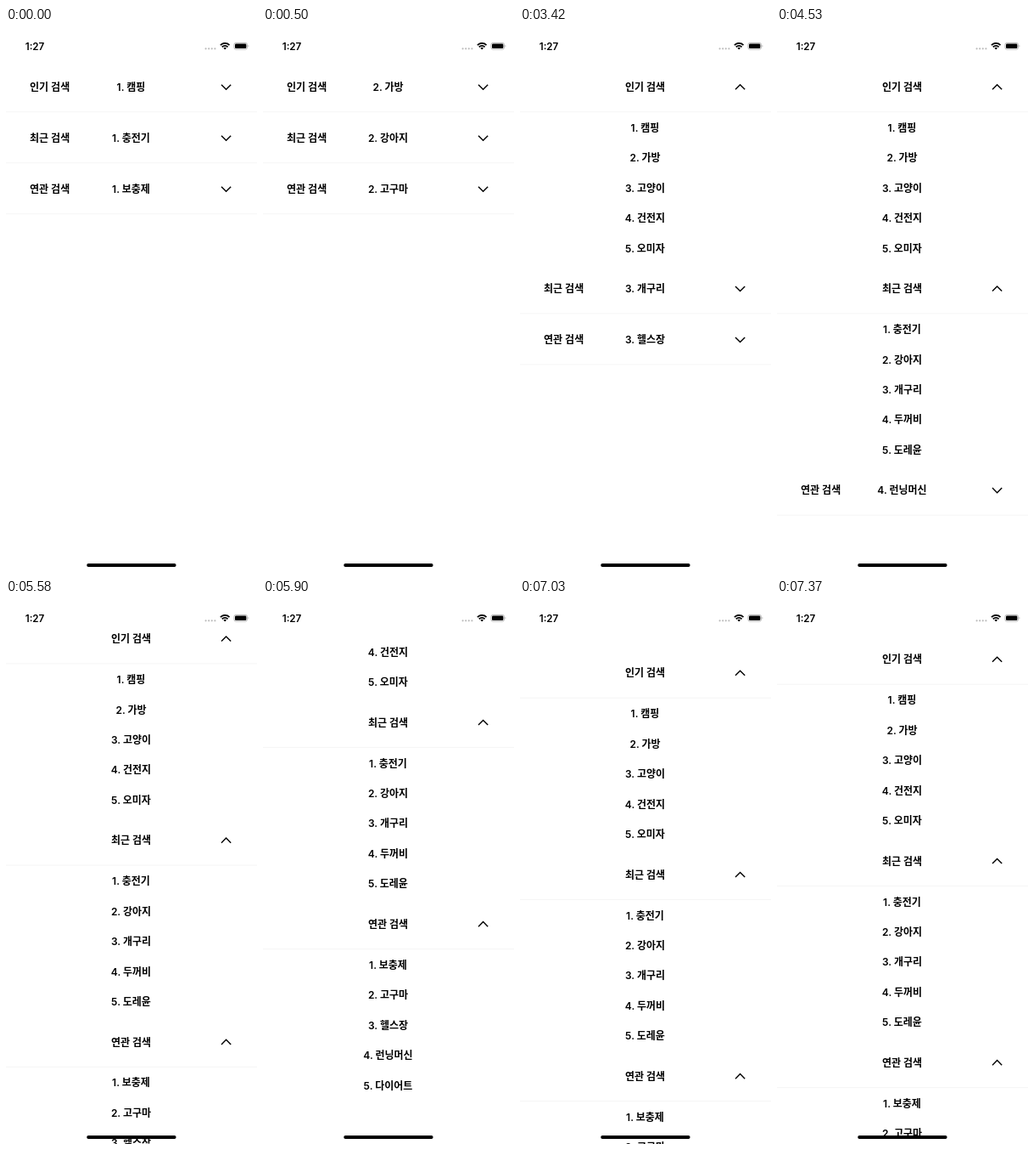
These frames come from a looping animation (296 by 640 pixels, 8000 ms). An HTML page:

```html
<!DOCTYPE html>
<html lang="ko">
<head>
<meta charset="utf-8">
<style>
html, body { margin: 0; width: 100%; height: 100%; overflow: hidden; background: #fff; }
svg { display: block; width: 296px; height: 640px; }
text { font: 600 12px Inter, 'Noto Sans CJK KR', 'Noto Sans CJK', sans-serif; }
.mid { text-anchor: middle; }
.chevron { fill: none; stroke: #000; stroke-width: 1.4; }
</style>
</head>
<body>
<svg viewBox="0 0 296 640">
  <g id="list"></g>
  <rect width="296" height="36" fill="#fff"/>
  <text class="mid" x="34" y="25.5" style="font-size:11.6px">1:27</text>
  <path d="M235.6 24.3h11" stroke="#bbb" stroke-width="2.2" stroke-linecap="round" stroke-dasharray="0 3.6"/>
  <g fill="none" stroke="#000" stroke-width="1.7">
    <path d="M252.9 20.2a7.4 7.4 0 0 1 10.6 0M254.8 22.3a4.8 4.8 0 0 1 6.8 0"/>
    <path d="M256.4 23.6a2.6 2.6 0 0 1 3.6 0L258.2 25.6Z" fill="#000" stroke="none"/>
  </g>
  <rect x="268.9" y="17.4" width="15.6" height="7.8" rx="2.3" fill="none" stroke="#aaa" stroke-width=".8"/>
  <rect x="270" y="18.5" width="13.4" height="5.6" rx="1.3"/>
  <path d="M285.5 20v2.6a1.4 1.4 0 0 0 0-2.6" fill="#aaa"/>
  <rect x="95.2" y="630" width="105.4" height="4" rx="2"/>
</svg>
<script>
const LOOP = 8000, TOP = 69.5, HEAD = 60, PITCH = 35.44, BODY = 5 * PITCH, MID = 147.5;

// A section starts to open at `start` and comes to rest at `settle`.
const sections = [
  { title: '인기 검색', words: ['캠핑', '가방', '고양이', '건전지', '오미자'], start: 2400, settle: 3420 },
  { title: '최근 검색', words: ['충전기', '강아지', '개구리', '두꺼비', '도레윤'], start: 3540, settle: 4530 },
  { title: '연관 검색', words: ['보충제', '고구마', '헬스장', '런닝머신', '다이어트'], start: 4840, settle: 5580 }
];

const mix = (a, b, x) => a + (b - a) * (1 - Math.cos(Math.PI * Math.min(x, 1))) / 2;
const label = (s, i) => `${i + 1}. ${s.words[i]}`;
const centred = (text, y = 0) => `<text class="mid" x="${MID}" y="${y + 4.4}">${text}</text>`;
const chevron = dir => `<path class="chevron" d="M254 ${-2.8 * dir}l5.6 ${5.6 * dir} 5.6 ${-5.6 * dir}"/>`;

// The list jumps most of the way in two steps, then waits.
function openness(s, t) {
  if (t < s.start) return 0;
  if (t >= s.settle) return 1;
  return 1 - .69 * .2 ** (t >= s.start + 100);
}

// A stepped scroll that overshoots to `peak` in four steps and eases back in three.
function swing(t, start, step, from, peak, to) {
  const n = Math.floor((t - start) / step) + 1;
  return n <= 4 ? mix(from, peak, n / 4) : mix(peak, to, (n - 4) / 3);
}

function scroll(t) {
  if (t < 5580) return 0;
  return t < 6690 ? swing(t, 5580, 105.5, 0, 162.5, 137.8) : swing(t, 6690, 113, 137.8, -16.5, -.5);
}

const list = document.getElementById('list');
for (const s of sections) {
  list.insertAdjacentHTML('beforeend', `<g>
    <path d="M0 29.2H296" stroke="#f5f5f5"/>
    <g><text x="28" y="4.4">${s.title}</text>${centred('')}${chevron(1)}</g>
    <g>${centred(s.title)}${chevron(-1)}
      ${s.words.map((_, i) => centred(label(s, i), 48 + i * PITCH)).join('')}</g>
  </g>`);
  s.node = list.lastElementChild;
  [s.line, s.closed, s.opened] = s.node.children;
  s.tick = s.closed.querySelector('.mid');
}

function draw(t) {
  const i = Math.floor((t + 1510) / 2010);
  let y = TOP - scroll(t);
  for (const s of sections) {
    const p = openness(s, t);
    s.node.setAttribute('transform', `translate(0 ${y})`);
    s.line.setAttribute('opacity', Math.abs(2 * p - 1));
    s.closed.setAttribute('opacity', 1 - p);
    s.opened.setAttribute('opacity', p);
    s.tick.textContent = label(s, i);
    y += HEAD + BODY * p;
  }
}

const begin = performance.now();
function frame() {
  draw((performance.now() - begin) % LOOP);
  requestAnimationFrame(frame);
}
frame();
</script>
</body>
</html>
```
